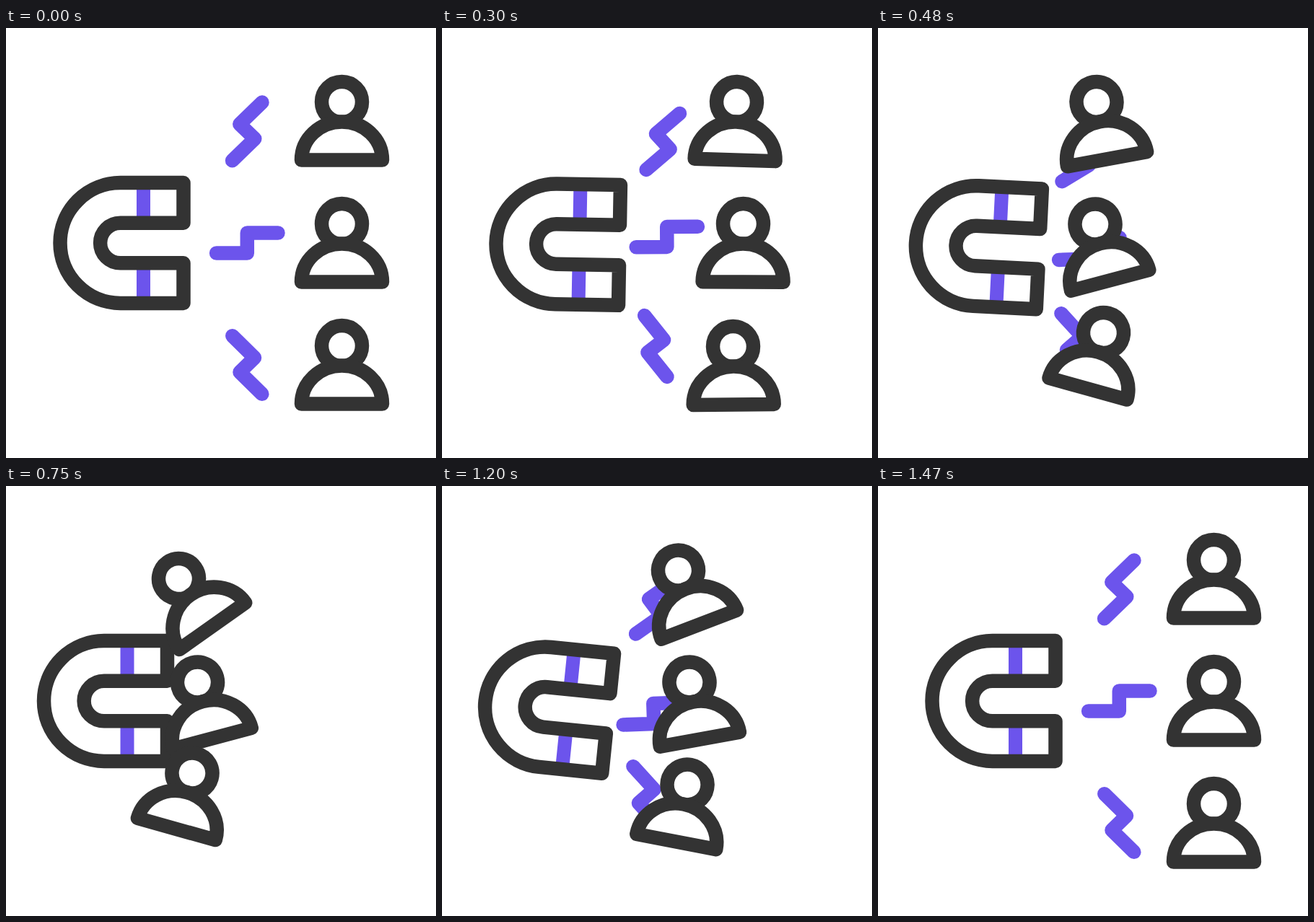
An HTML page for the animation above (1500 ms loop, 596 by 596 pixels).

```html
<!DOCTYPE html>
<html lang="en">
<head>
<meta charset="utf-8">
<title>Magnet attracting people</title>
<style>
  html, body { margin: 0; width: 100%; height: 100%; overflow: hidden; background: #fff; }
  svg { display: block; width: 100vw; height: 100vh; }
  .ink { fill: #fff; stroke: #333; }
  .spark { fill: none; stroke: #6c54ec; }
</style>
</head>
<body>
<svg viewBox="0 0 596 596" stroke-width="19.5" stroke-linecap="round" stroke-linejoin="round">
  <defs>
    <g id="person" class="ink">
      <circle r="28"/>
      <path d="M-56 80.5a56 53 0 0 1 112 0z"/>
    </g>
  </defs>
  <g class="spark">
    <path id="bolt1" d="M20.7-40.5L-10.5-10.3 10.5 10 -20.7 40.3"/>
    <path id="bolt2" d="M42.7-14H0V14H-42.7"/>
    <path id="bolt3" d="M-20.5-40.3L10.2-10 -10.3 10 20.5 40.3"/>
  </g>
  <!-- origin at the middle of the bend, which is the pivot -->
  <g id="magnet">
    <path id="shape" fill="#fff" d="M171-83.4H83.4a83.4 83.4 0 0 0 0 166.8H171V27.8H83.4a27.8 27.8 0 0 1 0-55.6H171z"/>
    <path class="spark" stroke-width="19" stroke-linecap="butt" d="M115.5-80V-30M115.5 30V80"/>
    <use href="#shape" class="ink" style="fill-opacity:0"/>
  </g>
  <use id="person1" href="#person"/>
  <use id="person2" href="#person"/>
  <use id="person3" href="#person"/>
</svg>
<script>
const LOOP = 1500, STEP = 30;
const TIMES = [60, 300, 480, 600, 750, 1050, 1080, 1200, 1350, 1470];

const mix = (a, b, k) => a + (b - a) * k;

// Smooth curve through the keys, flat at every turning point.
function curve(values) {
  const slope = i => (values[i + 1] - values[i]) / (TIMES[i + 1] - TIMES[i]);
  const tangents = values.map((_, i) => {
    if (i === 0 || i === values.length - 1) return 0;
    const a = slope(i - 1), b = slope(i);
    return a * b > 0 ? 2 * a * b / (a + b) : 0;
  });
  return t => {
    if (t <= TIMES[0]) return values[0];
    const i = TIMES.findIndex(end => end > t) - 1;
    if (i < 0) return values[values.length - 1];
    const h = TIMES[i + 1] - TIMES[i], u = (t - TIMES[i]) / h, v = 1 - u;
    return v * v * (1 + 2 * u) * values[i] + u * u * (3 - 2 * u) * values[i + 1]
      + h * u * v * (v * tangents[i] - u * tangents[i + 1]);
  };
}

// Offsets from rest: leaving, pulled in, held, on the way back.
const track = ([leave, pull, hold, back]) => curve([
  0, leave, pull, mix(hold, pull, 0.09), hold,
  hold, mix(hold, back, 0.088), back, back * 0.23, 0
]);

function part(id, x, y, dx, dy, turn) {
  const node = document.getElementById(id);
  const [fx, fy, fr] = [dx, dy, turn].map(track);
  return t => node.setAttribute("transform",
    `translate(${x + fx(t)} ${y + fy(t)}) rotate(${fr(t)})`);
}

const parts = [
  part("magnet", 75, 298, [0, -22.5, -22.5, -15], [0, 0, 0, 0], [1, 2.8, 0, 5.8]),
  part("bolt1", 334.3, 143.5, [-28, -50, -65.5, -39], [14, 34.5, 42, 25], [3.6, 13, 15, 9]),
  part("bolt2", 334.3, 298, [-22.5, -41.5, -68, -41], [-8.5, 8, 29, 17.5], [-0.3, -2, -3, -2]),
  part("bolt3", 334.3, 467, [-38, -62, -85, -51], [-26, -30, -62, -37], [6.7, 3, 5, 3]),
  part("person1", 465.5, 102.5, [-57, -162.5, -226, -138], [0, 0, 26, 14.5], [1.7, -10.4, -35.3, -21]),
  part("person2", 465.5, 271.5, [-48, -164.5, -200, -122.5], [0, 0.5, 0.5, 0.5], [0.3, -14.9, -14.9, -10.3]),
  part("person3", 465.5, 440.5, [-62, -153, -207.5, -125.5], [1, -18, -42.5, -26.5], [-0.5, 15.5, 15.6, 10.9])
];

function draw(ms) {
  const t = Math.floor((ms % LOOP) / STEP) * STEP;
  parts.forEach(move => move(t));
}

const start = performance.now();
function tick() {
  draw(performance.now() - start);
  requestAnimationFrame(tick);
}
tick();
</script>
</body>
</html>
```
